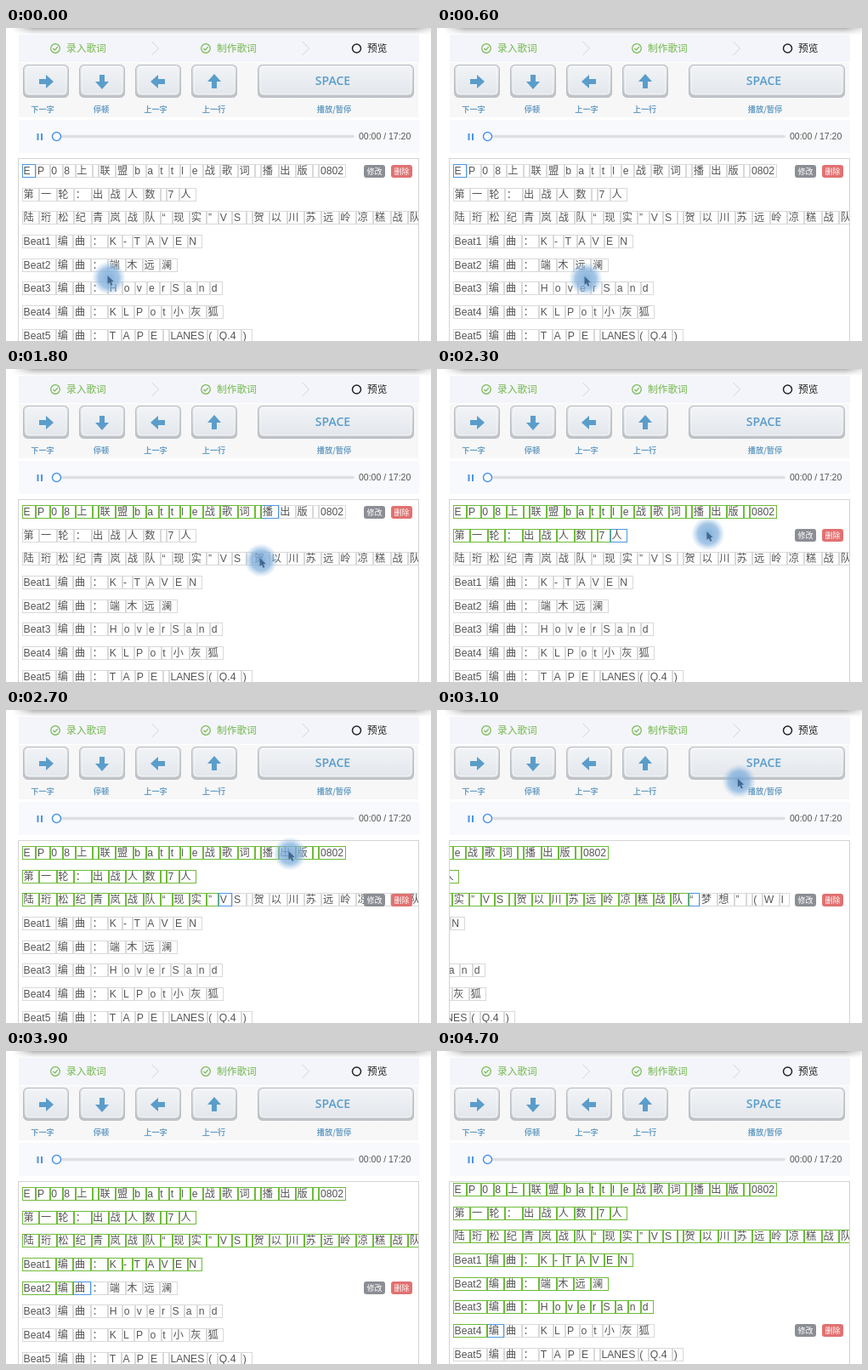
An HTML page that plays this animation: 500 px wide and 368 px high, repeating every 4.8 s.

```html
<!DOCTYPE html>
<html lang="zh-CN">
<head>
<meta charset="utf-8">
<title>歌词制作</title>
<style>
  html, body { margin: 0; width: 100%; height: 100%; overflow: hidden; background: #fff; }
  body { font-family: "Liberation Sans", "Noto Sans CJK SC", "Noto Sans CJK", sans-serif; }
  #stage { position: relative; width: 500px; height: 368px; overflow: hidden; }
  #panel { position: absolute; left: 0; top: 0; }
  #list {
    position: absolute; left: 14px; top: 153px; width: 470px; height: 230px;
    border: 1px solid #d4d4d4; overflow: hidden;
  }
  #rows { position: absolute; left: 4px; top: 6px; }
  .row { position: absolute; left: 0; display: flex; height: 16px; font-size: 12.2px; line-height: 14px; color: #555; }
  .cell {
    flex: none; box-sizing: content-box; min-width: 4.3px; height: 14px;
    padding: 0 5.6px 0 .6px; border: 1px solid #d9d9d9; white-space: pre;
  }
  .quote { min-width: 5.5px; }
  .space { min-width: 0; width: 0; padding: 0 2.5px; }
  .tight { padding-right: 2.4px; }
  .done { border-color: #6fba3a; }
  .now { border-color: #4a98e4; }
  #tools { position: absolute; left: 406px; }
  #tools span {
    position: absolute; top: 0; width: 25px; height: 15px; border-radius: 3px;
    font: 500 9px/15px "Noto Sans CJK SC", "Noto Sans CJK", sans-serif;
    color: #fff; text-align: center; background: #8b8e94;
  }
  #tools span + span { left: 32px; background: #e27171; }
  #pointer { position: absolute; left: -20px; top: -20px; }
</style>
</head>
<body>
<div id="stage">
  <svg id="panel" width="500" height="153" font-family="Noto Sans CJK SC, Noto Sans CJK, sans-serif">
    <defs>
      <linearGradient id="shade" x2="0" y2="1">
        <stop stop-color="#b4b4b4"/><stop offset=".5" stop-color="#dedede"/><stop offset="1" stop-color="#fff"/>
      </linearGradient>
      <linearGradient id="edge" x2="1" y2="0">
        <stop stop-color="#fff"/><stop offset=".05" stop-color="#fff" stop-opacity="0"/>
        <stop offset=".96" stop-color="#fff" stop-opacity="0"/><stop offset="1" stop-color="#fff" stop-opacity=".7"/>
      </linearGradient>
      <linearGradient id="rim" x2="0" y2="1"><stop stop-color="#dfe1e4"/><stop offset="1" stop-color="#bfc3c8"/></linearGradient>
      <linearGradient id="face" x2="0" y2="1"><stop stop-color="#f1f3f6"/><stop offset="1" stop-color="#e3e7ec"/></linearGradient>
      <path id="arrow" d="M-8-3H0V-8L9 0 0 8V3H-8Z" fill="#5a9dcb"/>
      <g id="tick" fill="none" stroke="#72b84c" stroke-width="1.2"><circle r="5.3"/><path d="M-2.6 0 -.6 2 2.8-1.8"/></g>
      <path id="chevron" d="M-4-8 4 0-4 8" fill="none" stroke="#d2d2d6"/>
    </defs>

    <rect x="8" width="492" height="8" fill="url(#shade)"/>
    <rect x="8" width="492" height="8" fill="url(#edge)"/>
    <rect x="15" y="8" width="471" height="32" fill="#f4f5fa"/>
    <use href="#tick" x="58" y="24"/>
    <use href="#tick" x="235" y="24"/>
    <circle cx="412.5" cy="24" r="5" fill="none" stroke="#222" stroke-width="1.5"/>
    <use href="#chevron" x="175.500" y="24"/>
    <use href="#chevron" x="352.500" y="24"/>
    <g font-size="11.700">
      <text x="71" y="28.200" fill="#72b84c">录入歌词</text>
      <text x="248" y="28.200" fill="#72b84c">制作歌词</text>
      <text x="425" y="28.200" fill="#222" font-weight="500">预览</text>
    </g>

    <rect x="15" y="41" width="470" height="64" fill="#f7f7f8"/>
    <g id="keys"></g>
    <text x="384.500" y="67" font-family="Open Sans, sans-serif" font-size="14" font-weight="600" fill="#5a9dcb" text-anchor="middle" id="wide">SPACE</text>

    <rect x="15" y="108" width="471" height="39" fill="#f8f9fc"/>
    <path d="M37.500 124v8M42 124v8" stroke="#4a94e6" stroke-width="2"/>
    <path d="M64 127.500H408" stroke="#dedfe3" stroke-width="3.500" stroke-linecap="round"/>
    <circle cx="59.500" cy="127.500" r="5" fill="#fff" stroke="#4a94e6" stroke-width="1.500"/>
    <text x="415" y="131.300" font-family="Liberation Sans, sans-serif" font-size="10.500" fill="#555">00:00 / 17:20</text>
  </svg>

  <div id="list">
    <div id="rows"></div>
    <div id="tools"><span>修改</span><span>删除</span></div>
  </div>

  <svg id="pointer" width="40" height="40">
    <defs>
      <radialGradient id="glow">
        <stop stop-color="#6ea3d6" stop-opacity=".85"/>
        <stop offset=".6" stop-color="#82b0dc" stop-opacity=".72"/>
        <stop offset="1" stop-color="#a5c8e8" stop-opacity="0"/>
      </radialGradient>
    </defs>
    <circle cx="20" cy="20" r="20" fill="url(#glow)"/>
    <path d="M18.500 17v10l2.400-2 1.700 3.800 1.800-.8-1.700-3.600 3-.3Z" fill="#44678c"/>
  </svg>
</div>

<script>
const LOOP = 4800, STEP = 100, PITCH = 27.65;
const $ = id => document.getElementById(id);

// Keyboard
const key = (x, w) =>
  `<rect x="${x}.500" y="43.500" width="${w}" height="38" rx="5" fill="url(#rim)" stroke="#b9bdc2"/>
   <rect x="${x + 3}" y="45" width="${w - 5}" height="33" rx="4" fill="url(#face)" stroke="#fafbfc"/>`;
const label = (x, text) =>
  `<text x="${x}" y="98.500" font-size="9.200" font-weight="700" fill="#6a9fc4" text-anchor="middle">${text}</text>`;
$('keys').innerHTML = [['下一字', 0, 43], ['停顿', 90, 112], ['上一字', 180, 176], ['上一行', -90, 244.5]]
  .map(([text, turn, x], i) => key(20 + 66 * i, 53) + label(x, text) +
    `<use href="#arrow" transform="translate(${47 + 66 * i} 63) rotate(${turn})"/>`)
  .join('') + key(296, 183) + label(386, '播放/暂停');

// Lyrics: one cell per character, brackets keep a word together
const lines = [
  'EP08上 联盟battle战歌词 播出版 [0802]',
  '第一轮：出战人数 7人',
  '陆珩松纪青岚战队“现实”VS 贺以川苏远岭凉糕战队“梦想” (WI',
  '[Beat1]编曲：K-TAVEN',
  '[Beat2]编曲：端木远澜',
  '[Beat3]编曲：HoverSand',
  '[Beat4]编曲：KLPot小灰狐',
  '[Beat5]编曲：TAPE [LANES]([Q.4])'
];
const cells = [];
lines.forEach((line, r) => {
  const row = document.createElement('div');
  row.className = 'row';
  row.style.top = r * PITCH + 'px';
  for (const [all, word] of line.matchAll(/\[([^\]]+)\]|./g)) {
    const el = document.createElement('span');
    const text = word || all;
    const kind = text === ' ' ? ' space' : /[“”]/.test(text) ? ' quote'
      : /^[A-Z0-9]{4,}$/.test(text) ? ' tight' : '';
    el.textContent = text.trim();
    row.append(el);
    cells.push({ el, r, base: 'cell' + kind });
    el.className = 'cell' + kind;
  }
  $('rows').append(row);
});

// Keys are [time, value, ...]
const progress = [[0, 0], [1100, 0], [1200, 1], [1800, 18], [2700, 46], [3300, 66], [3900, 80], [4700, 100], [4800, 100]];
const path = [[0, 121, 294], [300, 142, 316], [700, 186, 288], [1200, 190, 287], [1800, 300, 225],
  [2700, 334, 169], [3300, 366, 41], [3600, 374, 6], [3800, 380, -25], [4800, 380, -25]];

function at(keys, t) {
  const i = Math.max(1, keys.findIndex(k => k[0] >= t));
  const a = keys[i - 1], b = keys[i];
  const u = (t - a[0]) / (b[0] - a[0]);
  return a.slice(1).map((v, n) => v + (b[n + 1] - v) * u);
}

function draw(t) {
  const now = Math.floor(at(progress, t)[0] + 1e-6);
  const { r } = cells[now];
  cells.forEach((c, i) => {
    c.el.className = c.base + (i < now ? ' done' : i === now ? ' now' : '');
  });
  const dx = r === 2 && now >= 58 ? -198 : 0;
  const dy = r >= 6 ? -5 : 0;
  $('rows').style.transform = `translate(${dx}px, ${dy}px)`;
  $('tools').style.top = 6.5 + r * PITCH + dy + 'px';
  const [x, y] = at(path, t);
  $('pointer').style.transform = `translate(${x}px, ${y}px)`;
}

const start = performance.now();
let last = -1;
function tick() {
  const t = Math.floor((performance.now() - start) % LOOP / STEP) * STEP;
  if (t !== last) draw(last = t);
  requestAnimationFrame(tick);
}
tick();
</script>
</body>
</html>
```
